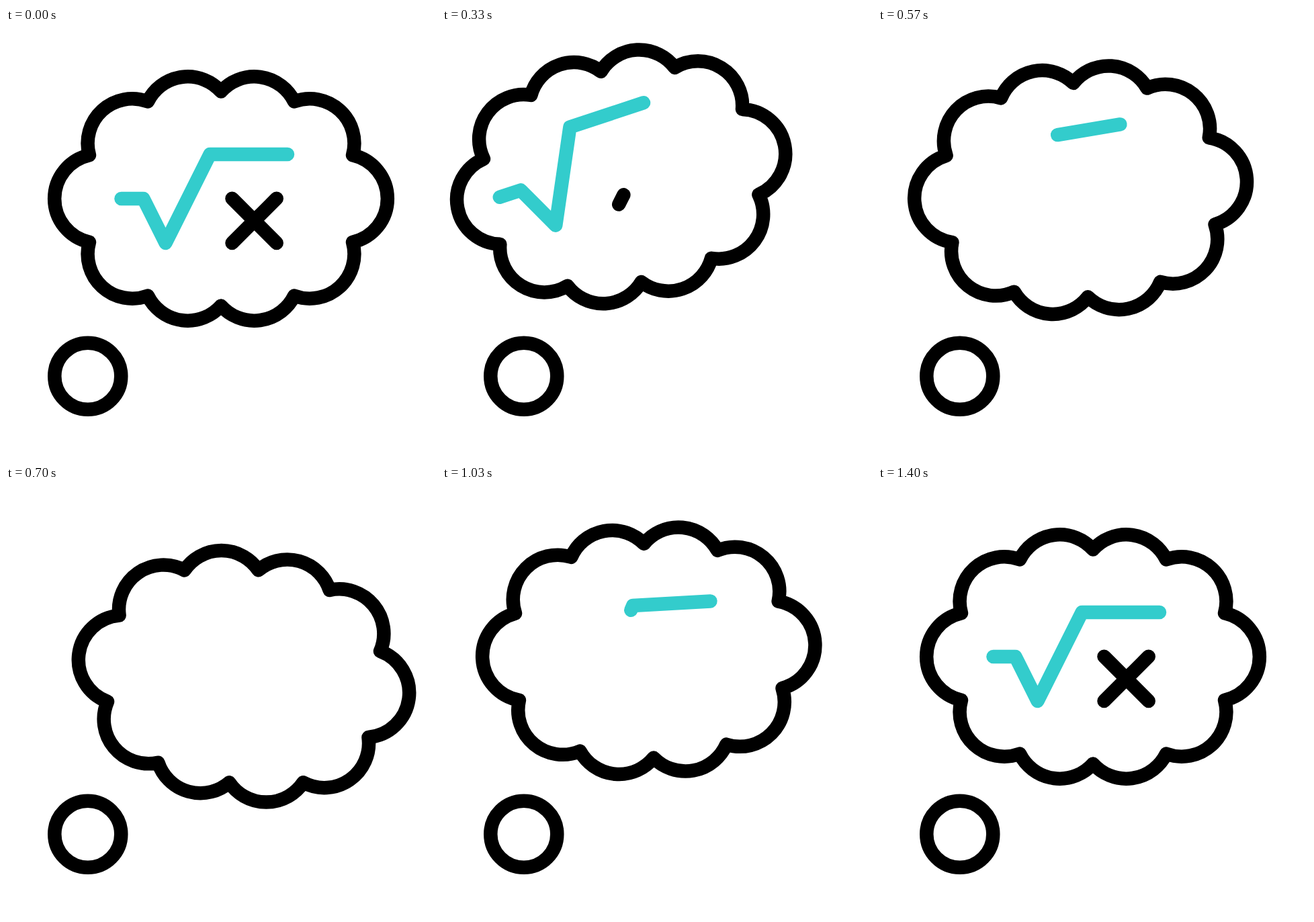
Animation, 640 px wide and 640 px high, one loop 1670 ms. Source, as an HTML page:

```html
<!DOCTYPE html>
<html>
<head>
<meta charset="utf-8">
<title>Thought bubble</title>
<style>
  html, body { margin: 0; height: 100%; overflow: hidden; background: #fff; }
  svg { display: block; width: 100vw; height: 100vh; }
  svg * { fill: none; stroke-width: 20.5; stroke-linecap: round; stroke-linejoin: round; }
</style>
</head>
<body>
<svg viewBox="0 0 640 640" stroke="#000">
  <circle cx="121.8" cy="518.2" r="49.5"/>
  <path id="cloud"/>
  <g id="formula">
    <path id="root" pathLength="1" stroke="#33cccc" d="M419 188H303.5L237.5 320L204.5 254H171.5"/>
    <path id="fall" pathLength="1" d="M336.5 253.7l66.2 66.2"/>
    <path id="rise" pathLength="1" d="M336.5 320l66.2 -66.2"/>
  </g>
</svg>
<script>
const LOOP = 1670, FPS = 30, LAST = 42;
const BEATS = [0, 13, 22, 29, 35, LAST]; // turning points of the swing, in steps
const el = id => document.getElementById(id);

// Ten equal arcs; the corners of one quarter are mirrored both ways
function cloudPath() {
  const quarter = [[-196, -64.7], [-109, -144.5], [0, -159.5]];
  const mirror = (points, sx, sy) => points.map(([x, y]) => [x * sx, y * sy]).reverse();
  const top = [...quarter, ...mirror(quarter.slice(0, 2), -1, 1)];
  const corners = [...top, ...mirror(top, 1, -1), top[0]];
  return 'M' + corners.map(([x, y]) => `${320 + x} ${254 + y}`).join('A66.3 66.3 0 0 1 ') + 'Z';
}

// Ease-in-out, cubic-bezier(.42, 0, .58, 1)
function ease(x) {
  if (x <= 0) return 0;
  if (x >= 1) return 1;
  let lo = 0, hi = 1, s;
  for (let i = 0; i < 24; i++) {
    s = (lo + hi) / 2;
    const bx = 3 * (1 - s) * s * (.42 * (1 - s) + .58 * s) + s ** 3;
    if (bx < x) lo = s; else hi = s;
  }
  return s * s * (3 - 2 * s);
}

// Rotate around the small circle through the given peak angles, then back to rest
function swing(id, step, ...peaks) {
  const angles = [0, ...peaks, 0];
  let angle = 0;
  for (let i = 1; i < angles.length; i++) {
    angle += (angles[i] - angles[i - 1]) * ease((step - BEATS[i - 1]) / (BEATS[i] - BEATS[i - 1]));
  }
  el(id).setAttribute('transform', `rotate(${angle} 121.8 518.2)`);
}

// Wipe a stroke away from step `hide`, draw it again from step `show`
function wipe(id, step, hide, show, span) {
  const part = 1 - ease((step - hide) / span) + ease((step - show) / span);
  const style = el(id).style;
  style.visibility = part > .001 ? 'visible' : 'hidden';
  style.strokeDasharray = part > .999 ? 'none' : `${part} 2`;
}

function draw(now) {
  const step = Math.min(LAST, Math.floor((now % LOOP + 3.4) * FPS / 1000));
  swing('cloud', step, -12.2, 8.3, -4, 2);
  swing('formula', step, -20.6, 6.8, -5, 2.3);
  wipe('fall', step, 2.5, 35, 7);
  wipe('rise', step, 5, 33, 7);
  wipe('root', step, 10.5, 27, 10);
  requestAnimationFrame(draw);
}

el('cloud').setAttribute('d', cloudPath());
draw(0);
</script>
</body>
</html>
```
